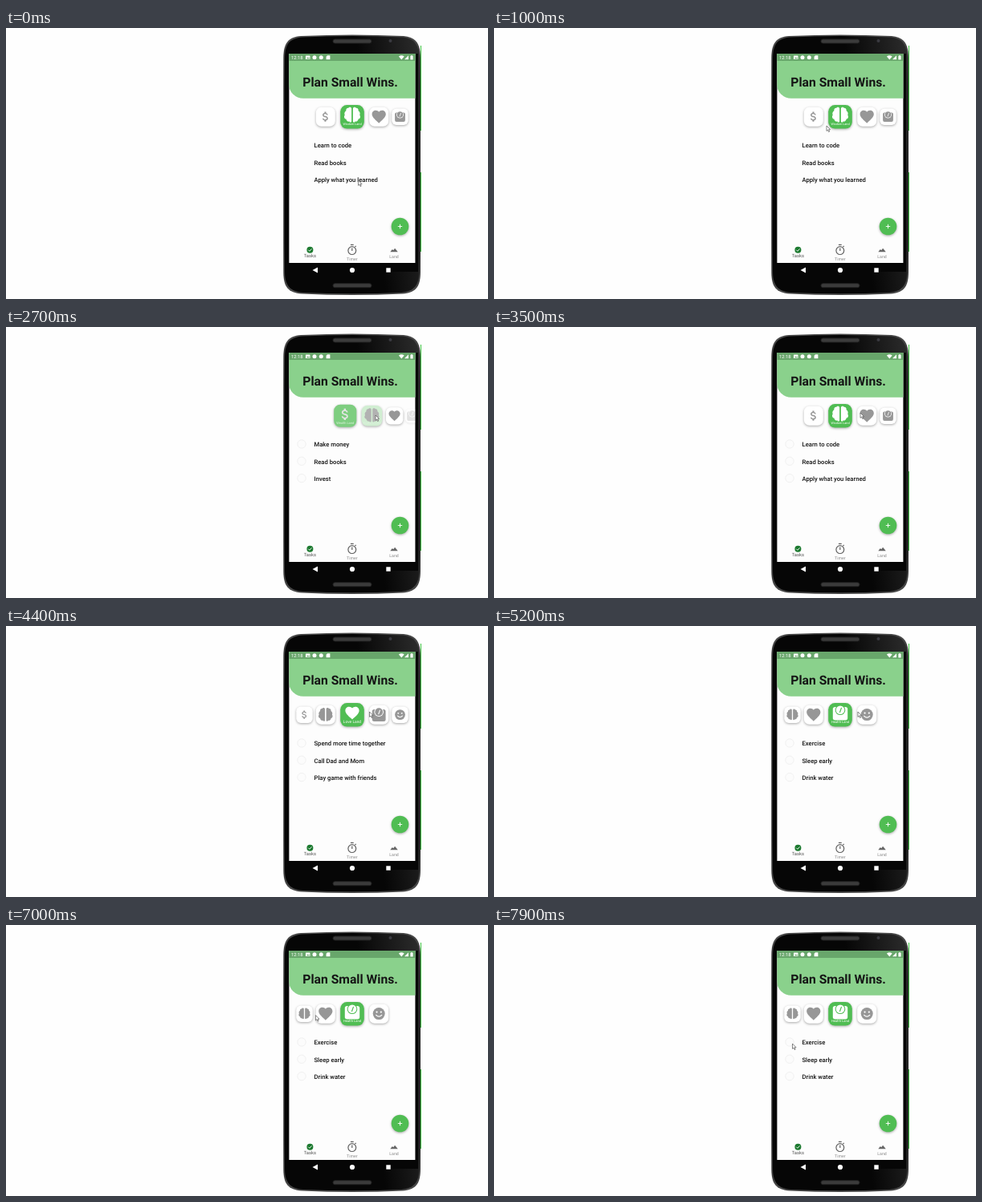
Recreate the animation shown at these times as an HTML page. Size 600 by 338 pixels, loop 8000 ms.

```html
<!DOCTYPE html>
<html lang="en">
<head>
<meta charset="utf-8">
<title>Task list</title>
<style>
  html, body { margin: 0; width: 100%; height: 100%; overflow: hidden; background: #fefefe; }
  svg { display: block; width: 600px; height: 338px; font-family: Roboto, Arial, sans-serif; text-rendering: geometricPrecision; }
  .card { fill: var(--bg); filter: drop-shadow(0 1.2px 1.5px #0005); }
  .icon { fill: var(--fg); }
  .cut { fill: var(--bg); }
  .line { fill: none; stroke: var(--bg); stroke-width: 1.3; stroke-linecap: round; }
  .label { fill: #fff; text-anchor: middle; }
  .task { font-size: 7.65px; font-weight: 500; fill: #151515; }
  .nav { text-anchor: middle; fill: #888; font-size: 5.2px; }
</style>
</head>
<body>
<svg viewBox="0 0 600 338">
  <defs>
    <clipPath id="screen"><rect x="352.4" y="32" width="157" height="261"/></clipPath>
    <linearGradient id="metal" x2="0" y2="1">
      <stop offset="0" stop-color="#4a4a4a"/><stop offset=".2" stop-color="#262626"/>
      <stop offset=".8" stop-color="#262626"/><stop offset="1" stop-color="#4a4a4a"/>
    </linearGradient>
    <linearGradient id="gloss" x1=".55" y1=".1" x2="1" y2="0">
      <stop offset="0" stop-color="#060606"/><stop offset="1" stop-color="#2c2c2c"/>
    </linearGradient>
    <path id="lobe" d="M11.1 4C11.1 2 8 1.6 7.2 3.4 5 3.2 4 5.2 4.4 6.8 2.4 8 1.8 10.4 2.8 12 1.2 14 2.2 16.8 4.4 17.2 4.6 19.6 6.8 20.8 8.2 20.2 9.2 22 11.1 21.6 11.1 19.6z"/>
  </defs>

  <!-- Phone body -->
  <path d="M516.5 22V128M516.5 180V279" stroke="#3fc443"/>
  <path d="M345.3 38C345.3 19 351 11.5 367 10Q431 6.8 495 10C510 11.5 516 19 516 38V304C516 323 510 330 494 331.5Q431 334.5 368 331.5C351 330 345.3 323 345.3 304z" fill="url(#metal)"/>
  <path d="M347 39C347 20 353 12.8 369 11.5Q431 8.5 493 11.5C508 12.8 514.3 20 514.3 39V303C514.3 321 508 328.5 492 330Q431 332.7 370 330C353 328.5 347 321 347 303z" fill="url(#gloss)"/>
  <rect x="348.5" y="32" width="164.5" height="272" fill="#060606"/>
  <g fill="#3b3b3b" stroke="#202020">
    <rect x="407" y="14" width="48" height="5" rx="2.5"/>
    <rect x="407" y="318.7" width="48" height="5" rx="2.5"/>
  </g>
  <circle cx="478.5" cy="16" r="2" fill="#3a3a40"/>
  <g fill="#fff">
    <path d="M381.5 302l6.5-3.6v7.2z"/><circle cx="431" cy="302" r="3.1"/><rect x="473.3" y="299.3" width="5.4" height="5.4"/>
  </g>

  <g clip-path="url(#screen)">
    <rect x="352" y="32" width="158" height="261" fill="#fdfdfd"/>
    <path d="M352 32H510V87.8H370A18 18 0 0 1 352 69.8z" fill="#8ad18c"/>
    <rect x="352" y="32" width="158" height="9" fill="#68a66b"/>
    <g fill="#fff">
      <text x="355" y="39.1" font-size="5.9">12:18</text>
      <rect x="373" y="34.5" width="5.5" height="4.6" rx=".6"/>
      <circle cx="384" cy="36.8" r="2.5"/><circle cx="392.3" cy="36.8" r="2.5"/>
      <path d="M400 34.3h3.4v5h-4.8v-3.6z"/>
      <path d="M492.3 39.4l-3.4-4q3.4-2.4 6.8 0zM501 34.3v5h-5zM503.4 34.8h.9v-.7h1.4v.7h.9v4.6h-3.2z"/>
      <path d="M374 38.2l1.4-1.7 1 1 .8-.8 1 1.5z" fill="#68a66b"/>
    </g>
    <text x="369.3" y="73.2" font-size="15.7" font-weight="700" fill="#151515">Plan Small Wins.</text>

    <g id="cards"></g>
    <g id="boxes" fill="#fcfcfc" stroke="#f1f1f1" stroke-width="1">
      <circle cx="368" cy="146" r="5.2"/><circle cx="368" cy="167.3" r="5.2"/><circle cx="368" cy="188.6" r="5.2"/>
    </g>
    <g id="tasks">
      <text class="task" x="383.5" y="149.3"/><text class="task" x="383.5" y="170.9"/><text class="task" x="383.5" y="191.9"/>
    </g>

    <circle cx="490.5" cy="247.5" r="10.8" fill="#50bd53" style="filter:drop-shadow(0 1.5px 1.5px #0005)"/>
    <path d="M487.8 247.5h5.4M490.5 244.8v5.4" stroke="#fff" stroke-width=".9"/>

    <circle cx="378.4" cy="276.7" r="4" fill="#1d7a30"/>
    <path d="M376.3 276.8l1.5 1.5 2.8-2.9" fill="none" stroke="#fff" stroke-width=".9"/>
    <g fill="none" stroke="#606060" stroke-width="1.2">
      <circle cx="430.8" cy="277.6" r="4.9"/><path d="M428.9 270.4h3.8M430.8 274.5v3.5M434.5 273l1.2-1.2"/>
    </g>
    <path d="M478.3 279.3l2.6-3.4 1.2 1.4 2-2.6 3.7 4.6z" fill="#666"/>
    <text class="nav" x="378.3" y="286.2" style="fill:#555;font-size:5.8px">Tasks</text>
    <text class="nav" x="430.8" y="289.6">Timer</text>
    <text class="nav" x="483" y="286.6">Land</text>
  </g>
  <path id="cursor" d="M0 0V6.4L1.5 5.1 2.6 7.6 3.7 7.1 2.6 4.7H4.6z" fill="#fff" stroke="#555" stroke-width=".7"/>
</svg>

<script>
const LOOP = 8000;
const $ = id => document.getElementById(id);

// scale: icon size when selected, next to the selection, and two steps away
const lands = [
  { name: 'Wealth Land', font: 4, scale: [.83, .68, .58],
    tasks: ['Make money', 'Read books', 'Invest'],
    icon: '<path class="icon" d="M11.8 10.9c-2.27-.59-3-1.2-3-2.15 0-1.09 1.01-1.85 2.7-1.85 1.78 0 2.44.85 2.5 2.1h2.21c-.07-1.72-1.12-3.3-3.21-3.81V3h-3v2.16c-1.94.42-3.5 1.68-3.5 3.61 0 2.31 1.91 3.46 4.7 4.13 2.5.6 3 1.48 3 2.41 0 .69-.49 1.79-2.7 1.79-2.06 0-2.87-.92-2.98-2.1h-2.2c.12 2.19 1.76 3.42 3.68 3.83V21h3v-2.15c1.95-.37 3.5-1.5 3.5-3.55 0-2.84-2.43-3.81-4.7-4.4z"/>' },
  { name: 'Wisdom Land', font: 3.8, scale: [1, .88, .72],
    tasks: ['Learn to code', 'Read books', 'Apply what you learned'],
    icon: '<g class="icon"><use href="#lobe"/><use href="#lobe" transform="translate(24) scale(-1 1)"/></g>' },
  { name: 'Love Land', font: 4.9, scale: [.86, .86, .66],
    tasks: ['Spend more time together', 'Call Dad and Mom', 'Play game with friends'],
    icon: '<path class="icon" d="M12 21.35l-1.45-1.32C5.4 15.36 2 12.28 2 8.5 2 5.42 4.42 3 7.5 3c1.74 0 3.41.81 4.5 2.09C13.09 3.81 14.76 3 16.5 3 19.58 3 22 5.42 22 8.5c0 3.78-3.4 6.86-8.55 11.54z"/>' },
  { name: 'Health Land', font: 4.1, scale: [.92, .84, .64],
    tasks: ['Exercise', 'Sleep early', 'Drink water'],
    icon: '<rect class="icon" x="2" y="4" width="20" height="18" rx="3"/><circle class="cut" cx="12" cy="8" r="6.9"/>' +
      '<circle class="icon" cx="12" cy="8" r="5.8"/><path class="line" d="M11.5 11l2-5.5"/>' },
  { name: 'Happiness Land', font: 3.1, scale: [.94, .75, .64],
    tasks: ['Play guitar', 'Go to Yosemite', 'Learn how to cook'],
    icon: '<circle class="icon" cx="12" cy="12" r="10"/><circle class="cut" cx="8.5" cy="9.3" r="1.5"/>' +
      '<circle class="cut" cx="15.5" cy="9.3" r="1.5"/><path class="line" style="stroke-width:1.7" d="M7.4 14.3q4.6 5 9.2 0"/>' },
];

// [time, selected land]
const selection = [[0, 1], [1450, 1], [1750, 0], [2600, 0], [2900, 1], [3600, 1], [3900, 2],
  [4600, 2], [4900, 3], [5400, 3], [5700, 4], [6400, 4], [6700, 3], [LOOP, 3]];
// [time, x, y]
const pointer = [[0, 438.5, 190], [1000, 414, 122], [1300, 400, 112], [1500, 400, 112], [1900, 439, 117],
  [2400, 460, 110], [2900, 460, 110], [3500, 456, 107], [4400, 452.5, 107], [5500, 453, 107],
  [6100, 386, 104.5], [6700, 388, 106], [7900, 371.5, 148], [LOOP, 371.5, 148]];

const clamp = v => Math.max(0, Math.min(1, v));
const lerp = (a, b, k) => a + (b - a) * k;
const mix = (a, b, k) => `rgb(${a.map((v, i) => Math.round(lerp(v, b[i], k)))})`;

function along(keys, t) {
  const i = keys.findIndex(key => key[0] > t);
  const [a, b] = [keys[i - 1], keys[i]];
  const k = (t - a[0]) / (b[0] - a[0]);
  return a.slice(1).map((v, j) => lerp(v, b[j + 1], k * k * (3 - 2 * k)));
}

function step(list, d) {
  const i = Math.min(Math.floor(d), list.length - 2);
  return lerp(list[i], list[i + 1], Math.min(d - i, 1));
}

$('cards').innerHTML = lands.map(({ name, font, icon }) =>
  `<g><rect class="card"/><g>${icon}</g><text class="label" y="121.4" font-size="${font}">${name}</text></g>`).join('');
const cards = [...$('cards').children];
const lines = [...$('tasks').children];
let shown = -1;

function place(card, land, offset) {
  const d = Math.abs(offset), on = clamp(1 - d);
  const x = 431 + Math.sign(offset) * step([0, 33.2, 59.5, 80], d);
  const size = step([29.6, 24, 20.4, 16], d);
  const scale = step(land.scale, d);
  const [rect, icon, label] = card.children;
  card.style.opacity = clamp(3 - d);
  card.style.display = d < 3 ? '' : 'none';
  card.style.setProperty('--bg', mix([255, 255, 255], [80, 189, 83], on));
  card.style.setProperty('--fg', mix([151, 151, 151], [255, 255, 255], on));
  const box = { x: x - size / 2, y: 110.8 - size / 2, width: size, height: size, rx: size * .28 };
  for (const key in box) rect.setAttribute(key, box[key]);
  icon.setAttribute('transform', `translate(${x} ${110.6 - 2.2 * on}) scale(${scale}) translate(-12 -12)`);
  label.setAttribute('x', x);
  label.style.opacity = on;
}

function draw(now) {
  const t = now % LOOP;
  const [selected] = along(selection, t);
  const [x, y] = along(pointer, t);
  cards.forEach((card, i) => place(card, lands[i], i - selected));
  const current = Math.round(selected);
  if (current !== shown) {
    shown = current;
    lines.forEach((line, i) => line.textContent = lands[shown].tasks[i]);
  }
  $('boxes').style.display = t < 1500 ? 'none' : '';
  $('cursor').setAttribute('transform', `translate(${x} ${y})`);
  requestAnimationFrame(draw);
}
requestAnimationFrame(draw);
</script>
</body>
</html>
```
